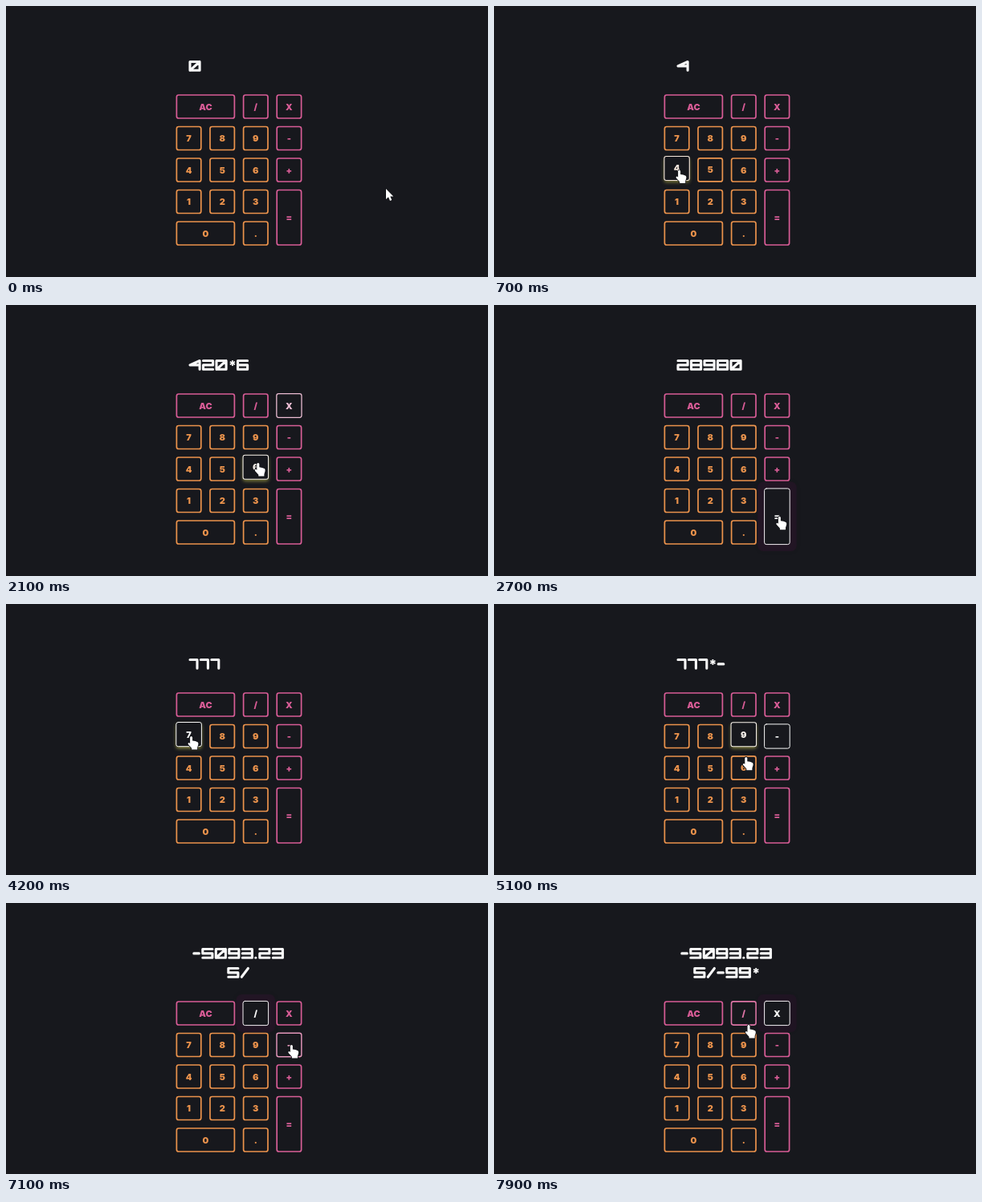
Write an HTML page with a canvas that moves like this. It is 600 px wide and 338 px high and loops after 8000 ms.

```html
<!DOCTYPE html>
<html lang="en">
<head>
<meta charset="utf-8">
<title>Calculator</title>
<style>
  html, body { margin: 0; width: 100%; height: 100%; overflow: hidden; background: #17181d; }
  canvas { display: block; }
</style>
</head>
<body>
<canvas id="stage" width="600" height="338"></canvas>
<script>
const ctx = document.getElementById('stage').getContext('2d');
const LOOP = 8000, BG = '#17181d';
const ORANGE = [236, 147, 76], PINK = [216, 92, 150], WHITE = [248, 248, 248];
const MAGENTA = [118, 14, 108], GLOW = [76, 12, 66];

const clamp = v => Math.max(0, Math.min(1, v));
const ease = v => v * v * (3 - 2 * v);
const mix = (a, b, k) => a.map((v, i) => v + (b[i] - v) * k);
const rgb = (c, a = 1) => `rgba(${c.map(Math.round)},${a})`;

// A label repeated in the grid makes a key that spans those cells.
const grid = ['AC AC / X', '7 8 9 -', '4 5 6 +', '1 2 3 =', '0 0 . ='].map(row => row.split(' '));
const keys = {};
grid.forEach((row, r) => row.forEach((label, c) => {
  const x = 212.4 + c * 41.6, y = 111 + r * 39.5;
  const k = keys[label] ??= { label, x, y, pink: r === 0 || c === 3 };
  k.w = x + 30.4 - k.x;
  k.h = y + 29 - k.y;
}));

// Bursts of clicks: first time, interval, keys
const clicks = [
  [600, 325, '4 2 0'], [1760, 240, 'X 6 9 ='], [3180, 0, 'AC'], [3560, 200, '7 7 7'],
  [4440, 340, 'X -'], [5200, 265, '6 . 5'], [5880, 145, '5 5'], [6265, 0, '='],
  [6880, 230, '/ - 9'], [7470, 200, '9 X']
].flatMap(([at, step, list]) => list.split(' ').map((key, i) => ({ at: at + i * step, key })));

// Display characters as strokes through a 3 by 3 grid of points a..i
const strokes = {
  0: 'aciga gc', 2: 'acfdgi', 3: 'acig df', 4: 'icdf', 5: 'cadfig', 6: 'cagifd',
  7: 'aci', 8: 'aciga df', 9: 'fdacig', '.': 'gg', '-': 'df', '/': 'gc'
};
const narrow = { 7: 13.4, '.': 5, '-': 11, '/': 12.5, '*': 10 };
const advance = c => narrow[c] || 16.5;
const textWidth = s => [...s].reduce((sum, c) => sum + advance(c), 0);

function display(t) {
  let text = '0';
  for (const { at, key } of clicks) {
    if (t < at + 90) break;
    if (key === 'AC') text = '0';
    else if (key === '=') text = String(+text.split('*').reduce((a, b) => a * b).toFixed(3));
    else text = (text === '0' ? '' : text) + (key === 'X' ? '*' : key);
  }
  const lines = [''];
  for (const c of text) {
    if (textWidth(lines.at(-1) + c) > 127) lines.push('');
    lines[lines.length - 1] += c;
  }
  return lines;
}

const shiftAt = t => (display(t).length - 1) * 12;

// The pointer visits every clicked key, hovers once over 9, and ends near "/".
const visits = [...clicks, { at: 4940, key: '9' }].sort((a, b) => a.at - b.at);
const stops = [{ at: 0, pos: [473, 228] }];
for (const { at, key } of visits) {
  const k = keys[key], x = stops.at(-1).pos[0];
  const inside = x > k.x + 4 && x < k.x + k.w - 4;
  stops.push({ at, pos: [inside ? x : k.x + k.w / 2 + 3, k.y + k.h / 2 + shiftAt(at)] });
}
stops.push({ at: 7940, pos: [317, 152] });

function pointer(t) {
  const i = stops.findIndex(s => s.at > t);
  if (i < 1) return (i ? stops.at(-1) : stops[0]).pos;
  const from = stops[i - 1], to = stops[i], arrive = to.at - 50;
  const distance = Math.hypot(to.pos[0] - from.pos[0], to.pos[1] - from.pos[1]);
  const leave = Math.max(from.at + 40, arrive - 100 - distance * 0.6);
  return mix(from.pos, to.pos, ease(clamp((t - leave) / (arrive - leave))));
}

function stateAt(t) {
  const [x, y] = pointer(t), dy = shiftAt(t);
  const hover = Object.values(keys).find(k =>
    Math.abs(x - k.x - k.w / 2) < k.w / 2 + 1 && Math.abs(y - dy - k.y - k.h / 2) < k.h / 2 + 1);
  return { hover: hover?.label, focus: clicks.findLast(c => c.at <= t)?.key };
}

function pressLevel(label, t) {
  const last = clicks.findLast(c => c.key === label && c.at <= t);
  if (!last) return 0;
  const d = t - last.at;
  return d < 80 ? clamp(d / 40) : clamp(1 - (d - 80) / 250) ** 2;
}

function box(x, y, w, h, r) {
  ctx.beginPath();
  ctx.roundRect(x, y, w, h, r);
}

function drawKey(k, dy, on, press) {
  const grow = on * 0.6, x = k.x - grow, w = k.w + 2 * grow, h = k.h + 2 * grow;
  const y = k.y + dy - grow - (k.pink ? 0 : 2.4 * on);
  const color = mix(k.pink ? PINK : ORANGE, WHITE, on);
  ctx.save();
  if (k.pink && press > 0) {
    ctx.fillStyle = ctx.shadowColor = rgb(GLOW, press);
    ctx.shadowBlur = 8;
    box(x - 8.5, y - 8.5, w + 17, h + 17, 7);
    ctx.fill();
    ctx.shadowColor = 'transparent';
  }
  if (!k.pink && on > 0) {
    ctx.shadowColor = `rgba(165,160,70,${on * 0.8})`;
    ctx.shadowBlur = 4;
    ctx.shadowOffsetY = 2.5;
  }
  ctx.fillStyle = BG;
  box(x, y, w, h, 2.5);
  ctx.fill();
  ctx.restore();
  ctx.strokeStyle = rgb(k.pink ? mix(color, MAGENTA, press * press) : color);
  ctx.lineWidth = 1.7 - 0.7 * on;
  ctx.stroke();
  ctx.fillStyle = rgb(color);
  ctx.fillText(k.label, x + w / 2, y + h / 2 + 4);
}

function drawLine(text, x, y) {
  for (const c of text) {
    const w = advance(c) - 4.4;
    ctx.beginPath();
    for (const stroke of (strokes[c] || '').split(' ')) {
      [...stroke].forEach((p, i) => {
        const n = p.charCodeAt(0) - 97;
        ctx[i ? 'lineTo' : 'moveTo'](x + 1.5 + (n % 3) * w / 2, y + 1.5 + Math.floor(n / 3) * 5.4);
      });
    }
    ctx.stroke();
    if (c === '*') ctx.fillText(c, x + 4.8, y + 13.5);
    x += advance(c);
  }
}

const ARROW = new Path2D('M0 0V13L3 10.3L5 15L7.3 14L5.3 9.5H9.3Z');
const HAND = new Path2D('M-1.5 1.2Q0 -1 1.5 1.2V5.4L5 6L8 7.2Q9 8 8.8 10L7.6 14V16.5H0.5V14.8L-4 9.8Q-4.2 7.6 -2.4 8.2L-1.5 9Z');

function draw(t) {
  ctx.fillStyle = BG;
  ctx.fillRect(0, 0, 600, 338);
  ctx.textAlign = 'center';

  const lines = display(t), dy = shiftAt(t);
  ctx.strokeStyle = ctx.fillStyle = rgb(WHITE);
  ctx.lineWidth = 3.1;
  ctx.lineJoin = ctx.lineCap = 'round';
  ctx.font = '900 17px Inter, "Liberation Sans", sans-serif';
  lines.forEach((s, i) => {
    const x = lines.length > 1 ? 289.8 - textWidth(s) / 2 : 227.5;
    drawLine(s, x, 68 - dy + i * 24);
  });

  // Transitions are the eased mean of the last 250 ms of on/off states.
  const recent = Array.from({ length: 12 }, (_, i) => stateAt(t - i * 21));
  ctx.font = '900 11px Inter, "Liberation Sans", sans-serif';
  for (const k of Object.values(keys)) {
    const on = recent.filter(s => s.hover === k.label || s.focus === k.label).length / recent.length;
    drawKey(k, dy, ease(on), pressLevel(k.label, t));
  }

  ctx.save();
  ctx.translate(...pointer(t));
  const shape = recent[0].hover ? HAND : ARROW;
  ctx.strokeStyle = '#111216';
  ctx.lineWidth = 1.6;
  ctx.stroke(shape);
  ctx.fillStyle = '#fff';
  ctx.fill(shape);
  ctx.restore();
}

const start = performance.now();
function frame() {
  draw((performance.now() - start) % LOOP);
  requestAnimationFrame(frame);
}
frame();
</script>
</body>
</html>
```
